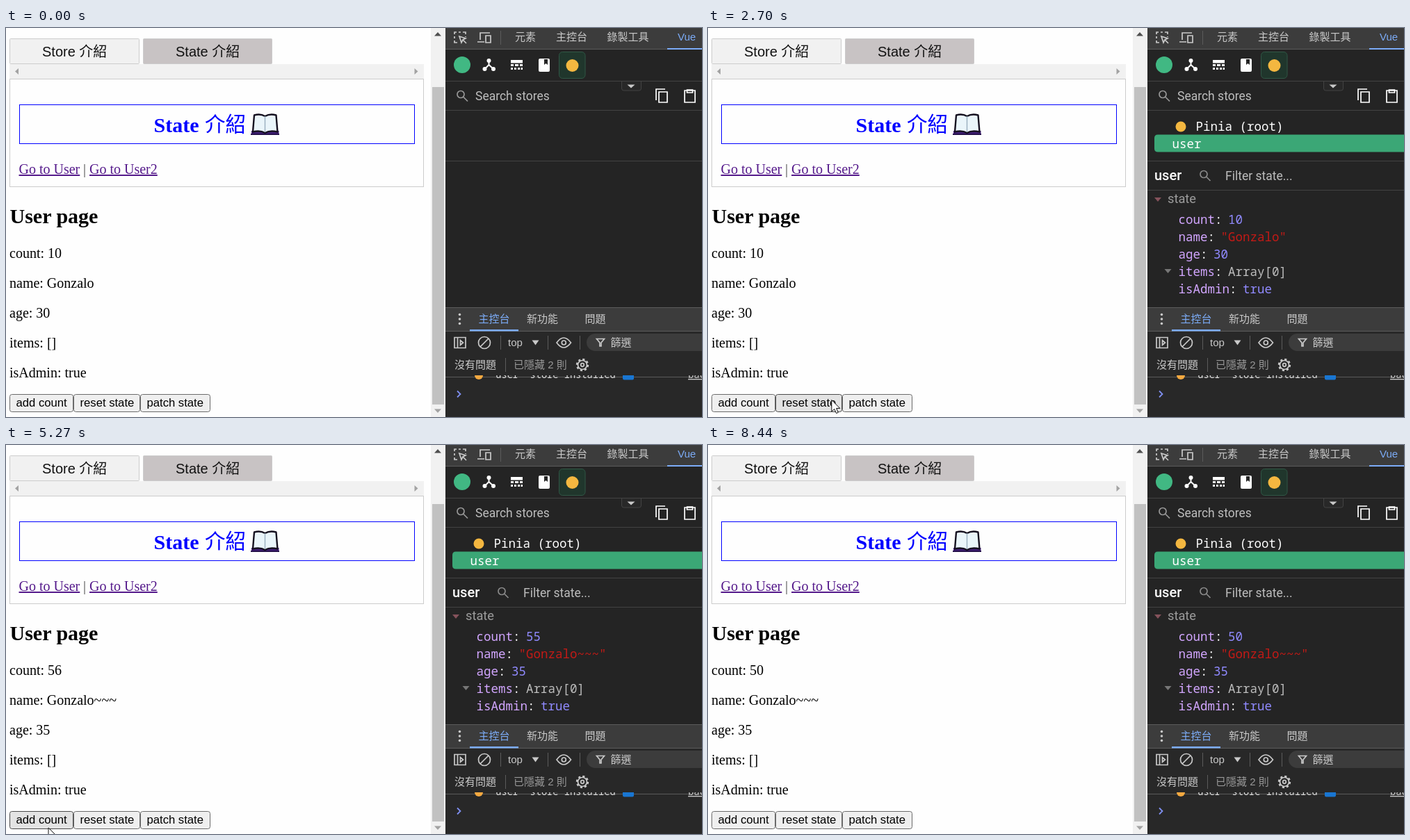
Animation, 1001 px wide and 560 px high, one loop 9120 ms. Source, as an HTML page:

```html
<!DOCTYPE html>
<html lang="zh-Hant">
<head>
<meta charset="utf-8">
<title>State demo</title>
<style>
html, body { margin: 0; width: 100%; height: 100%; overflow: hidden; background: #fefefe; }
svg { display: block; width: 100%; height: 100%; }
text { white-space: pre; }
.serif { font: 20px "Liberation Serif", "Noto Sans CJK TC", serif; }
.head { font-size: 30px; font-weight: bold; }
.sans { font: 300 20px "Liberation Sans", "Noto Sans CJK TC", sans-serif; }
.btn text { font: 16.667px "Liberation Sans", sans-serif; }
.btn rect { fill: #efefef; stroke: #6b6b6b; }
.btn.hover rect { fill: #e3e3e3; stroke: #4a4a4a; }
.link { fill: #551a8b; text-decoration: underline; }
.ui { font: 300 15px "Liberation Sans", "Noto Sans CJK TC", sans-serif; fill: #c9c9c9; }
.rob { font: 17.5px Roboto, sans-serif; fill: #bdbdbd; }
.mono { font: 17.5px "Noto Sans Mono", monospace; fill: #fff; }
.key { fill: #d2a6ff; }
.num { fill: #908aff; }
.str { fill: #c41a16; }
.arr { fill: #bdbdbd; }
.blue { fill: #7cacf8; }
.line { fill: none; stroke: #c9c9c9; stroke-width: 1.7; }
.rule { fill: none; stroke: #434343; }
.sep { fill: none; stroke: #5b5b5b; }
.bar { fill: #3c3c3c; }
</style>
</head>
<body>
<svg viewBox="0 0 1001 560" preserveAspectRatio="none">
  <defs><clipPath id="log"><rect x="632" y="500" width="369" height="8"/></clipPath></defs>
  <rect width="1001" height="560" fill="#fefefe"/>

  <!-- page -->
  <g class="sans" fill="#111">
    <rect x="5.5" y="15.5" width="186" height="36" rx="1" fill="#f1f1f1" stroke="#ccc"/>
    <rect x="197.5" y="15.5" width="185" height="36" rx="1" fill="#c8c3c4" stroke="#ccc"/>
    <text x="52" y="41">Store 介紹</text>
    <text x="244" y="41">State 介紹</text>
  </g>
  <rect x="5" y="52" width="596" height="21" fill="#f1f1f1"/>
  <path d="M18 58v9l-5-4.500zM587.500 58v9l5-4.500z" fill="#a3a3a3"/>
  <rect x="5.500" y="73.500" width="595" height="155" fill="none" stroke="#ccc"/>
  <rect x="19.500" y="110.500" width="568" height="56" fill="none" stroke="#00f"/>
  <g fill="#00f">
    <text class="serif head" x="212.500" y="149.500">State</text>
    <text class="serif" x="286" y="149" style="font-size:29.500px">介紹</text>
  </g>
  <g id="book">
    <path d="M353 148h39.500v5h-39.500z" fill="#43207a"/>
    <path d="M357 125.500q9-2.500 15.500 1.500 7-4 16-1.500l2 24q-11-2.500-18 1.500-7-4-17.500-1.500z" fill="#eaf5fa" stroke="#15101f" stroke-width="2.400" stroke-linejoin="round"/>
    <path d="M372.500 127v23" stroke="#9db3c2" stroke-width="1.500"/>
    <path d="M352 153h41" stroke="#24104a" stroke-width="2"/>
  </g>
  <g class="serif">
    <text class="link" x="18.500" y="210">Go to User</text>
    <text x="111" y="210" fill="#444">|</text>
    <text class="link" x="120" y="210">Go to User2</text>
    <text class="head" x="5.500" y="281">User page</text>
    <text x="5" y="331" id="pCount"></text>
    <text x="5" y="374" id="pName"></text>
    <text x="5" y="417" id="pAge"></text>
    <text x="5" y="460">items: []</text>
    <text x="5" y="503">isAdmin: true</text>
  </g>
  <g id="buttons"></g>
  <rect x="611" width="21" height="560" fill="#f1f1f1"/>
  <rect x="613" y="85" width="17" height="457" fill="#c1c1c1"/>
  <path d="M616 11.500h10l-5-5.500z" fill="#505050"/>
  <path d="M616 548.500h10l-5 5.500z" fill="#a3a3a3"/>

  <!-- devtools tabs -->
  <rect x="632" width="369" height="560" fill="#282828"/>
  <rect x="632" width="369" height="30" class="bar"/>
  <g class="line">
    <path d="M645 9V6h3M651 6h3M657 6h4v3M645 12v3M645 18v3h4M661 12v1"/>
    <path d="M652 12l9 3-4 2-2 4zM657 17l5 5"/>
    <path d="M682 17V7h14M678 20h10M690 11h7v10h-7z"/>
  </g>
  <path d="M711.500 4v20" class="sep"/>
  <g class="ui">
    <text x="732" y="18">元素</text>
    <text x="791" y="18">主控台</text>
    <text x="864.500" y="18">錄製工具</text>
    <text x="966" y="18" class="blue">Vue</text>
  </g>
  <path d="M632 30.500h369" class="sep"/>
  <rect x="951" y="29" width="50" height="2" class="blue"/>

  <!-- Vue panel -->
  <rect x="632" y="31" width="369" height="371" fill="#242424"/>
  <circle cx="656" cy="53" r="12" fill="#41b883"/>
  <g fill="#fff">
    <circle cx="694.500" cy="47" r="3"/><circle cx="688.500" cy="59" r="3"/><circle cx="701" cy="59" r="3"/>
    <path d="M694.500 47v6l-6 6M694.500 53l6.500 6" fill="none" stroke="#fff" stroke-width="2"/>
    <path d="M726 46h17v4.500h-17zM726 52h4v3h-4zM732 52h5v3h-5zM739 52h4v3h-4zM726 57h3v3h-3zM731 57h3v3h-3zM736 57h3v3h-3zM740.500 57h2.500v3h-2.500z"/>
    <rect x="766" y="44" width="16" height="19" rx="2"/>
    <path d="M774 45h5v8l-2.500-2-2.500 2z" fill="#242424"/>
  </g>
  <rect x="795.500" y="34.500" width="37.500" height="38" rx="5" fill="#20362c" stroke="#2f5745"/>
  <circle cx="814.500" cy="54" r="9" fill="#f4b740"/>
  <path d="M632 76.500h369M632 118.500h369M632 191.500h369" class="rule"/>
  <path d="M885.500 77v10q0 3 3 3h22q3 0 3-3v-10" fill="#282828" stroke="#434343"/>
  <path d="M893.500 81.500h11l-5.500 5z" fill="#c9c9c9"/>
  <g class="line">
    <g stroke="#999"><circle cx="654" cy="95.500" r="5"/><path d="M658 99.500l6 6"/></g>
    <path d="M939 92h12v15h-12zM935 104V88h13" stroke="#fff"/>
    <path d="M976 90h15v17h-15zM979.500 89h8v4h-8z" stroke="#fff"/>
  </g>
  <text class="rob" x="675" y="104">Search stores</text>

  <g id="panel">
    <circle cx="680" cy="142" r="7.500" fill="#f4b740"/>
    <text class="mono" x="701.500" y="147.500">Pinia (root)</text>
    <path d="M1001 153.500H647q-5 0-5 5v15q0 5 5 5h354z" fill="#3ba776"/>
    <text class="mono" x="667.500" y="172.500">user</text>
    <text class="rob" x="642" y="219" style="font-size:20px;font-weight:500;fill:#fff">user</text>
    <g class="line" style="stroke:#8a8a8a"><circle cx="713" cy="210.500" r="5"/><path d="M717 214.500l5.500 5.500"/></g>
    <text class="rob" x="744" y="219">Filter state...</text>
    <path d="M632 233.500h369" class="rule"/>
    <path d="M642 244h10l-5 6z" fill="#85525b"/>
    <text class="rob" x="661" y="252" style="font-size:18.300px;fill:#9c9c9c">state</text>
    <path d="M656.500 347h10l-5 6z" fill="#777"/>
    <g id="fields" class="mono"></g>
  </g>

  <!-- drawer -->
  <rect x="632" y="403" width="369" height="33" class="bar"/>
  <path d="M632 402.500h369M632 436.500h369" class="sep"/>
  <g fill="#c9c9c9"><circle cx="652.500" cy="412.500" r="1.800"/><circle cx="652.500" cy="419" r="1.800"/><circle cx="652.500" cy="425.500" r="1.800"/></g>
  <rect x="667" y="434" width="70" height="2.500" class="blue"/>
  <rect x="835" y="440" width="180" height="25" rx="12.500" class="bar"/>
  <g class="ui">
    <text x="679.500" y="424" class="blue">主控台</text>
    <text x="749" y="424">新功能</text>
    <text x="832.500" y="424">問題</text>
    <text x="722" y="458">top</text>
    <text x="869.500" y="458">篩選</text>
    <text x="645" y="490">沒有問題</text>
    <text x="730" y="490" fill="#989898">已隱藏 2 則</text>
  </g>
  <path d="M756.500 449.500h10l-5 7z" fill="#c9c9c9"/>
  <path d="M711.500 443v20M779.500 443v20M825.500 443v20M718.500 475v20" class="sep"/>
  <g class="line">
    <path d="M645 445.500h16v15h-16zM649.500 446v14M653.500 449.500v7l4-3.500z"/>
    <circle cx="688" cy="453" r="8.500"/><path d="M682 459l12-12"/>
    <path d="M792 453q10-14 20.500 0q-10.500 14-20.500 0z"/><circle cx="802.300" cy="453" r="3"/>
    <path d="M849.500 447.500h11l-4.500 5.500v5h-2v-5z"/>
    <circle cx="829" cy="485" r="6.500"/><circle cx="829" cy="485" r="2.300"/>
    <circle cx="829" cy="485" r="8" stroke-width="2.400" stroke-dasharray="3.140 3.140"/>
  </g>
  <path d="M632 502.500h369" class="sep"/>
  <g clip-path="url(#log)">
    <circle cx="680" cy="500" r="6" fill="#f4a940"/>
    <text class="mono" x="696" y="504" style="font-size:13.700px;fill:#ddd">"user" store installed</text>
    <rect x="887" y="492" width="16" height="14.500" rx="2" fill="#1976d2"/>
    <text class="mono" x="981" y="504" style="font-size:13.700px;fill:#c9c9c9;text-decoration:underline">bac</text>
  </g>
  <path d="M649 522.500l4.500 4.500-4.500 4.500" fill="none" stroke="#7f8ff0" stroke-width="1.800"/>

  <circle id="halo" r="14" fill="#f2e12a" opacity=".8"/>
  <path id="cursor" d="M0 0V16.500l4-3.500 2.700 6.200 2.700-1.200-2.600-6H12z" fill="#fff" stroke="#111"/>
</svg>
<script>
const LOOP = 9120, LAG = 130, PRESS = 110;
const $ = id => document.getElementById(id);

function add(parent, tag, attrs, content = "") {
  const el = document.createElementNS("http://www.w3.org/2000/svg", tag);
  for (const k in attrs) el.setAttribute(k, attrs[k]);
  el.textContent = content;
  return parent.appendChild(el);
}

// [left edge, width, label]
const buttons = [[5.5, 91, "add count"], [97.5, 95, "reset state"], [193.5, 100, "patch state"]]
  .map(([x, w, label]) => {
    const g = add($("buttons"), "g", { class: "btn" });
    add(g, "rect", { x, y: 527.5, width: w, height: 25, rx: 3 });
    add(g, "text", { x: x + 9, y: 545 }, label);
    return { g, x, w };
  });

const fields = {};
[["count", "num"], ["name", "str"], ["age", "num"], ["items", "arr", "Array[0]"], ["isAdmin", "num", "true"]]
  .forEach(([key, cls, value], i) => {
    const y = 282 + 25 * i, end = 676.5 + 10.5 * key.length;
    add($("fields"), "text", { x: 676.5, y, class: "key" }, key);
    add($("fields"), "text", { x: end, y }, ":");
    fields[key] = add($("fields"), "text", { x: end + 19, y, class: cls }, value);
  });

// click time and the count it leaves
const clicks = [[1370, 11], [1600, 12], [1830, 13], [2420, 10], [3150, 50],
  [4320, 51], [4500, 52], [4660, 53], [4835, 54], [5040, 55], [5270, 56],
  [6020, 50], [7640, 10], [8150, 50]];

// cursor stops: time, x, y
const visits = [
  [[390, 655, 380], [950, 150, 541], [1290, 52, 535], [1830, 49, 531], [1960, 50, 532],
    [2100, 140, 534], [2580, 140, 534], [2910, 264, 539], [3780, 264, 539], [4050, 61, 551],
    [5420, 61, 551], [5880, 284, 545], [6220, 284, 545], [6710, 1003, 556]],
  [[7370, 157, 557], [7500, 150, 539], [7680, 150, 539], [7900, 245, 539],
    [8170, 245, 539], [8440, 900, 562]]
];

function stateAt(t) {
  let count = 10;
  for (const [at, n] of clicks) if (t >= at) count = n;
  const patched = count >= 50;
  return { count, name: patched ? "Gonzalo~~~" : "Gonzalo", age: patched ? 35 : 30 };
}

function cursorAt(t) {
  const stops = visits.find(v => t >= v[0][0] && t < v[v.length - 1][0]);
  if (!stops) return null;
  const i = stops.findIndex(s => s[0] > t);
  const [t0, x0, y0] = stops[i - 1], [t1, x1, y1] = stops[i];
  const p = (t - t0) / (t1 - t0), e = p * p * (3 - 2 * p);
  return { x: x0 + (x1 - x0) * e, y: y0 + (y1 - y0) * e };
}

function setText(el, value) {
  if (el.textContent !== value) el.textContent = value;
}

function show(el, on) {
  el.style.display = on ? "" : "none";
}

function render(t) {
  const page = stateAt(t), tool = stateAt(t - LAG), c = cursorAt(t);
  setText($("pCount"), "count: " + page.count);
  setText($("pName"), "name: " + page.name);
  setText($("pAge"), "age: " + page.age);
  setText(fields.count, String(tool.count));
  setText(fields.name, `"${tool.name}"`);
  setText(fields.age, String(tool.age));
  show($("panel"), t >= 70);

  for (const b of buttons) {
    const over = c && c.x >= b.x && c.x < b.x + b.w && c.y >= 527 && c.y < 553;
    b.g.classList.toggle("hover", !!over);
  }
  const pressed = clicks.some(([at]) => t >= at - PRESS && t < at);
  show($("cursor"), c);
  show($("halo"), c && pressed);
  if (c) {
    const move = `translate(${c.x.toFixed(1)} ${c.y.toFixed(1)})`;
    $("cursor").setAttribute("transform", move);
    $("halo").setAttribute("transform", move);
  }
}

const start = performance.now();
function tick() {
  render((performance.now() - start) % LOOP);
  requestAnimationFrame(tick);
}
tick();
</script>
</body>
</html>
```
